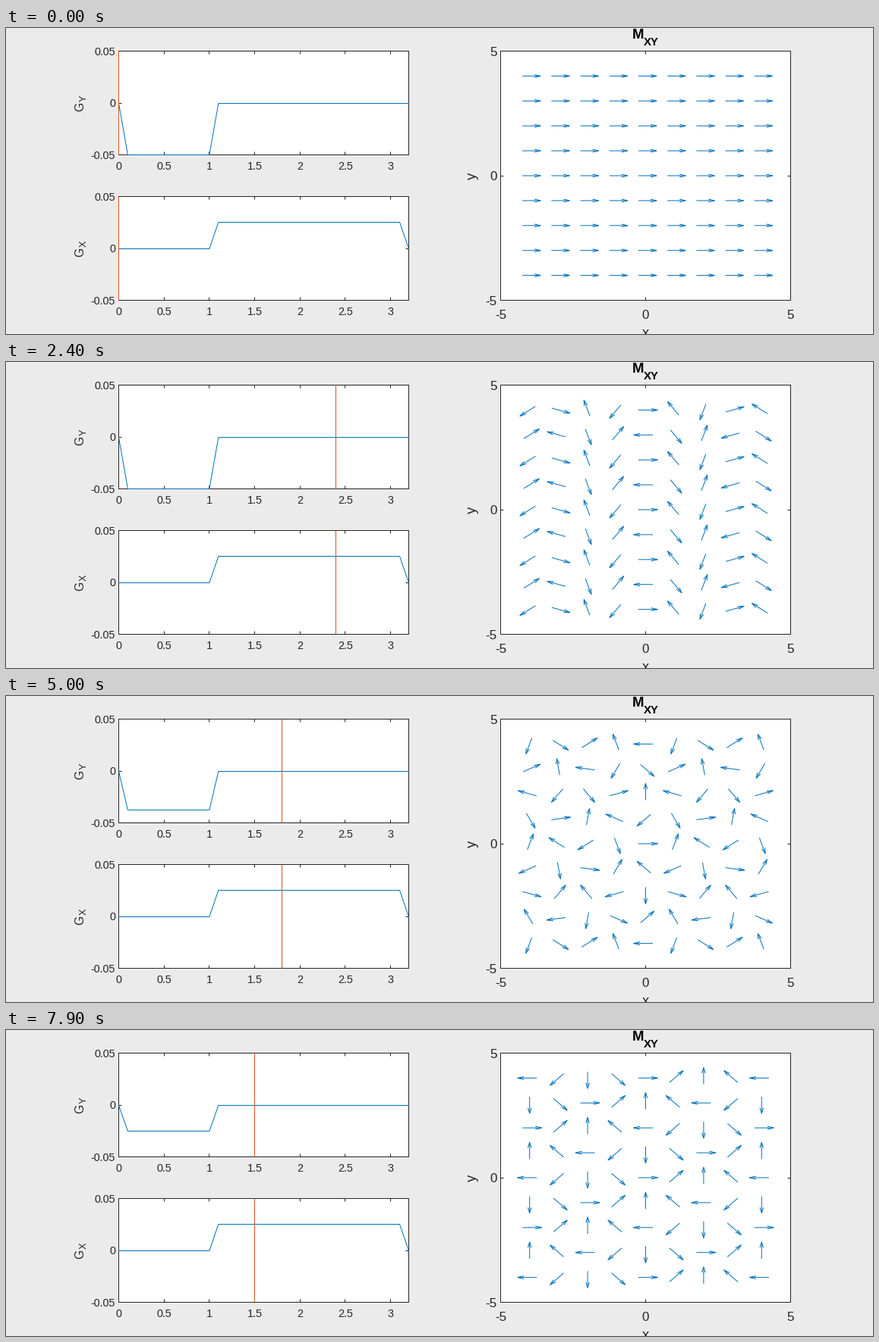
These frames come from a looping animation (1142x404 px, 8000 ms). A matplotlib script:

```python
import numpy as np
import matplotlib.pyplot as plt
from matplotlib.animation import FuncAnimation
from matplotlib.collections import LineCollection

W, H, DPI = 1142, 404, 64
PX = 72 / DPI                      # points per pixel
BLUE, ORANGE, INK = "#0072bd", "#d95319", "#262626"
FRAMES, STEPS, DT = 80, 32, 0.1
T_MAX, G_MAX = 3.2, 0.05
GY_LEVELS = [-0.05, -0.0375, -0.025]
GX_LEVEL = 0.025
HEAD_LENGTH, HEAD_WIDTH = 0.33, 0.27

plt.rcParams["font.family"] = "Liberation Sans"
plt.rcParams["path.snap"] = False  # coordinates already sit on pixel centres
fig = plt.figure(figsize=(W / DPI, H / DPI), dpi=DPI, facecolor="#ebebeb")
ax = fig.add_axes([0, 0, 1, 1])
ax.set_xlim(0, W)
ax.set_ylim(H, 0)
ax.axis("off")


def stroke(xs, ys, color=INK, z=2, **kw):
    return ax.plot(xs, ys, color=color, lw=PX, zorder=z, **kw)[0]


def label(x, y, s, size, ha="center", color=INK, **kw):
    ax.text(x, y, s, fontsize=size * PX, ha=ha, va="baseline",
            color=color, rotation_mode="anchor", **kw)


def snap(v):
    return np.floor(v) + 0.5


class Panel:
    """A boxed plot area with inward ticks on all four sides."""

    def __init__(self, box, xlim, ylim, xticks, yticks, size, gap):
        self.box, self.xlim, self.ylim = box, xlim, ylim
        x0, y0, x1, y1 = box
        ax.fill([x0, x1, x1, x0], [y0, y0, y1, y1], color="white", lw=0, zorder=1)
        stroke([x0, x1, x1, x0, x0], [y0, y0, y1, y1, y0],
               solid_joinstyle="miter", solid_capstyle="projecting")
        for v in xticks:
            x = self.px(v)
            for y, d in ((y0, 4), (y1, -4)):
                stroke([snap(x)] * 2, [y, y + d], solid_capstyle="butt")
            label(x, y1 + gap, f"{v:g}", size)
        for v in yticks:
            y = self.py(v)
            for x, d in ((x0, 4), (x1, -4)):
                stroke([x, x + d], [snap(y)] * 2, solid_capstyle="butt")
            label(x0 - 0.3 * size, y + 0.37 * size, f"{v:g}", size, "right")

    def px(self, v):
        (x0, _, x1, _), (a, b) = self.box, self.xlim
        return x0 + (np.asarray(v) - a) / (b - a) * (x1 - x0)

    def py(self, v):
        (_, y0, _, y1), (a, b) = self.box, self.ylim
        return y1 - (np.asarray(v) - a) / (b - a) * (y1 - y0)

    def points(self, x, y):
        return np.stack([self.px(x), self.py(y)], -1).reshape(-1, 2)


def gradient_panel(top, bottom, sub):
    panel = Panel((148.5, top, 530.5, bottom), (0, T_MAX), (-G_MAX, G_MAX),
                  np.arange(0, 3.1, 0.5), (-G_MAX, 0, G_MAX), 14.4, 19.8)
    mid = (top + bottom) / 2
    label(101.8, mid + 10.5, "G", 15.8, "left", rotation=90)
    label(106.2, mid - 1.8, sub, 12.7, "left", rotation=90)
    return panel


gy_panel = gradient_panel(30.5, 167.5, "Y")
gx_panel = gradient_panel(222.5, 359.5, "X")
field = Panel((651.5, 30.5, 1033.5, 359.5), (-5, 5), (-5, 5),
              (-5, 0, 5), (-5, 0, 5), 17, 24.8)

label(824.8, 14.3, "M", 18.5, "left", "black", weight="bold")
label(840.3, 23, "XY", 15, "left", "black", weight="bold")
label(842.5, 407.5, "x", 18.5)
label(619, 195, "y", 18.5, rotation=90)

GY_TIMES = [0, 0.1, 1, 1.1, T_MAX]
stroke(gx_panel.px([0, 1, 1.1, 3.1, T_MAX]),
       snap(gx_panel.py([0, 0, GX_LEVEL, GX_LEVEL, 0])), BLUE, 3)
gy_curve = stroke(gy_panel.px(GY_TIMES), [0] * 5, BLUE, 3)
cursors = [stroke([0, 0], [p.box[1], p.box[3]], ORANGE, 4,
                  solid_capstyle="butt")
           for p in (gy_panel, gx_panel)]

X, Y = np.meshgrid(np.arange(-4, 5), np.arange(-4, 5))
shafts = LineCollection([], colors=BLUE, linewidths=PX, zorder=3)
heads = LineCollection([], colors=BLUE, linewidths=PX, zorder=3,
                       joinstyle="round")
ax.add_collection(shafts)
ax.add_collection(heads)


def draw_arrows(phase):
    u, v = np.cos(phase), np.sin(phase)
    x, y = X - u / 4, Y - v / 4
    # Arrow length follows the spacing of the tails.
    scale = 0.5 * np.hypot(np.ptp(x) / 9, np.ptp(y) / 9)
    u, v = scale * u, scale * v
    tip = field.points(x + u, y + v)

    def barb(side):
        w = side * HEAD_WIDTH
        return field.points(x + u - HEAD_LENGTH * (u + w * v),
                            y + v - HEAD_LENGTH * (v - w * u))

    shafts.set_segments(np.stack([field.points(x, y), tip], 1))
    heads.set_segments(np.stack([barb(1), tip, barb(-1)], 1))


def update(i):
    block, step = divmod(i, STEPS)
    level = GY_LEVELS[block]
    gy_curve.set_ydata(snap(gy_panel.py([0, level, level, 0, 0])))

    # Each sample of a gradient turns the spins by 2 pi G per unit of length.
    ky = level * min(step, 10)
    kx = GX_LEVEL * max(step - 10, 0)
    draw_arrows(2 * np.pi * (kx * X + ky * Y))

    for line in cursors:
        line.set_xdata([snap(148.1 + 119.45 * step * DT)] * 2)
    return [gy_curve, shafts, heads, *cursors]


anim = FuncAnimation(fig, update, frames=FRAMES, interval=100,
                     init_func=lambda: update(0), repeat=True, repeat_delay=0)
plt.show()
```
